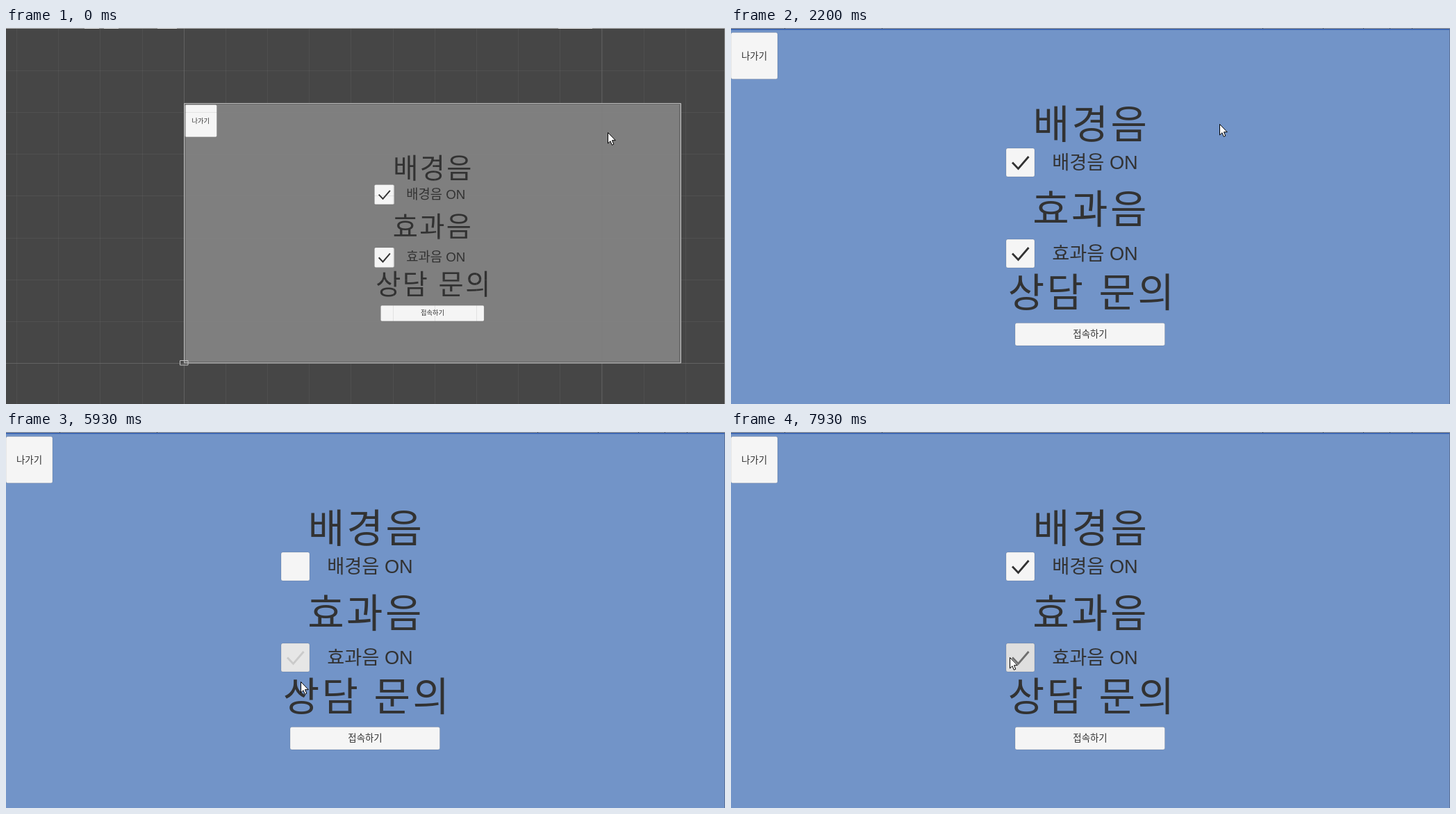
An HTML page for the animation above (8000 ms loop, 1035 px wide and 541 px high).

```html
<!DOCTYPE html>
<html lang="ko">
<meta charset="utf-8">
<style>
  html, body { margin: 0; width: 100%; height: 100%; overflow: hidden; background: #464646 }
  svg { display: block }
  text { font: 57px "Liberation Sans", "Noto Sans CJK KR", "Noto Sans CJK", sans-serif; fill: #323232; text-anchor: middle }
  .title { letter-spacing: .06em }
  .label { font-size: 27.2px }
  .small { font-size: 13.4px }
  .button { stroke: #0003; stroke-width: .6 }
  .check { fill: none; stroke: #323232; stroke-width: 2.8 }
</style>
<svg width="1035" height="541" viewBox="0 0 1035 541">
  <g id="editor">
    <path fill="#464646" d="M0 0H1035V541H0Z"/>
    <path fill="#7f7f7f" d="M257 108H971V482H257Z"/>
  </g>
  <g id="game">
    <path fill="#7294c8" d="M0 0H1035V541H0Z"/>
    <path fill="#3f68b2" d="M0 1H1035V3H0Z"/>
    <path fill="#9a9894" d="M0 0H1035V1H0Z"/>
    <path stroke="#555" d="M77.5 0v1M217.5 0v1M765.5 0v1M852.5 0v1M910.5 0v1M948.5 0v1M980.5 0v1"/>
    <path fill="#5c7299" d="M1034 1h1V541h-1z"/>
  </g>
  <g id="ui">
    <rect class="button" fill="#f5f5f5" x="0" y="6.5" width="67" height="67" rx="2.5"/>
    <text class="small" x="33.5" y="45">나가기</text>
    <text class="title" x="518.5" y="159">배경음</text>
    <text class="title" x="518" y="280.5">효과음</text>
    <text class="title" x="520" y="400.5">상담 문의</text>
    <text class="label" x="524" y="202.5">배경음 ON</text>
    <text class="label" x="524" y="333.5">효과음 ON</text>
    <rect class="button" id="music" x="396" y="173" width="41" height="41" rx="2.5"/>
    <path class="check" id="musicCheck" d="M405 193.500l8.500 9l15-17.500"/>
    <rect class="button" id="sound" x="396" y="304" width="41" height="41" rx="2.5"/>
    <path class="check" id="soundCheck" d="M405 324.500l8.500 9l15-17.500"/>
    <rect class="button" id="link" x="409" y="424.500" width="215.500" height="32.500" rx="2.5"/>
    <text class="small" x="517" y="445">접속하기</text>
  </g>
  <g id="overlay" fill="none">
    <path id="grid" stroke="#808080" stroke-opacity=".16"/>
    <path stroke="#808080" stroke-opacity=".4" d="M256.500 0V541M858 0V541M0 482.500H1035"/>
    <path stroke="#bcbcbc" d="M256.500 108.500H971.500V482H256.500Z"/>
    <path stroke="#676767" d="M258 109.500H969.500V480.500H258Z"/>
    <path stroke="#c4c4c4" d="M250.500 478.500H262V485H250.500Z"/>
    <path id="strip" d="M0 .5H1035"/>
    <path stroke="#f0f0f0" d="M113 .5h21M141 .5h21M218 .5h28M795 .5h49"/>
    <path stroke="#8a8a8a" d="M1034.500 1V541"/>
  </g>
  <path id="cursor" fill="#fff" stroke="#000" d="M.5 .5V16L4 12.700L6.300 18.300L8.800 17.200L6.500 11.700H11.300Z"/>
</svg>
<script>
  const LOOP = 8000, STEP = 1000 / 15, PLAY = 2199, FADE = 100;
  const $ = id => document.getElementById(id);

  // Cursor moves, eased: from, to, x, y
  const moves = [
    [0, 530, 722, -30], [600, 601, 772, -30], [1067, 1733, 703, 138],
    [2200, 2670, 697, 147], [2950, 3733, 419, 194], [5300, 5680, 416, 318],
    [5835, 6080, 439, 434], [6430, 6765, 428, 198], [7133, 7266, 426, 350],
    [7600, 7733, 423, 338], [7800, 7933, 401, 324]
  ];
  const clicks = [
    { id: 'music', down: 5067, up: 5190 },
    { id: 'sound', down: 5700, up: 5850 },
    { id: 'link', down: 6330, up: 6430 },
    { id: 'music', down: 6870, up: 7080 },
    { id: 'sound', down: 7760, up: 7873 }
  ];
  const areas = {};
  for (const id of ['music', 'sound', 'link']) areas[id] = $(id).getBBox();

  function cursorAt(t) {
    let x = 866, y = 150;
    for (const [from, to, toX, toY] of moves) {
      const p = Math.min(1, Math.max(0, (t - from) / (to - from)));
      const ease = p * p * (3 - 2 * p);
      x += (toX - x) * ease;
      y += (toY - y) * ease;
    }
    return [x, y];
  }

  function shadeAt(id, t) {
    const last = clicks.findLast(c => c.down <= t);
    if (last?.id === id && t < last.up) return 200;
    const [x, y] = cursorAt(t), { x: left, y: top, width, height } = areas[id];
    const hovered = t > PLAY && x > left && x < left + width && y > top && y < top + height;
    return hovered || last?.id === id ? 235 : 245;
  }

  const checkedAt = (id, t) => 1 - clicks.filter(c => c.id === id && c.up <= t).length % 2;

  // A linear fade is the mean state over the time just passed.
  function faded(state, id, t) {
    let sum = 0;
    for (let i = 0; i < 20; i++) sum += state(id, t - i * FADE / 20);
    return sum / 20;
  }

  let lines = '';
  for (let x = 15.5; x < 1035; x += 60.17) lines += `M${Math.floor(x) + .5} 0V541`;
  for (let y = 61.5; y < 541; y += 60.15) lines += `M0 ${Math.floor(y) + .5}H1035`;
  $('grid').setAttribute('d', lines);

  function draw(now) {
    const t = Math.floor((now % LOOP + 4) / STEP) * STEP;
    const playing = t > PLAY;
    $('game').style.display = playing ? '' : 'none';
    $('editor').style.display = $('overlay').style.display = playing ? 'none' : '';
    $('ui').setAttribute('transform', playing ? '' : 'translate(257.200 106) scale(.69 .691)');
    $('strip').setAttribute('stroke', t < 930 ? '#b0b0b0' : '#989898');
    for (const id in areas) {
      const v = Math.round(faded(shadeAt, id, t));
      $(id).style.fill = `rgb(${v},${v},${v})`;
    }
    for (const id of ['music', 'sound']) $(id + 'Check').style.opacity = faded(checkedAt, id, t);
    $('cursor').setAttribute('transform', `translate(${cursorAt(t).map(Math.round)})`);
    requestAnimationFrame(draw);
  }
  requestAnimationFrame(draw);
</script>
</html>
```
